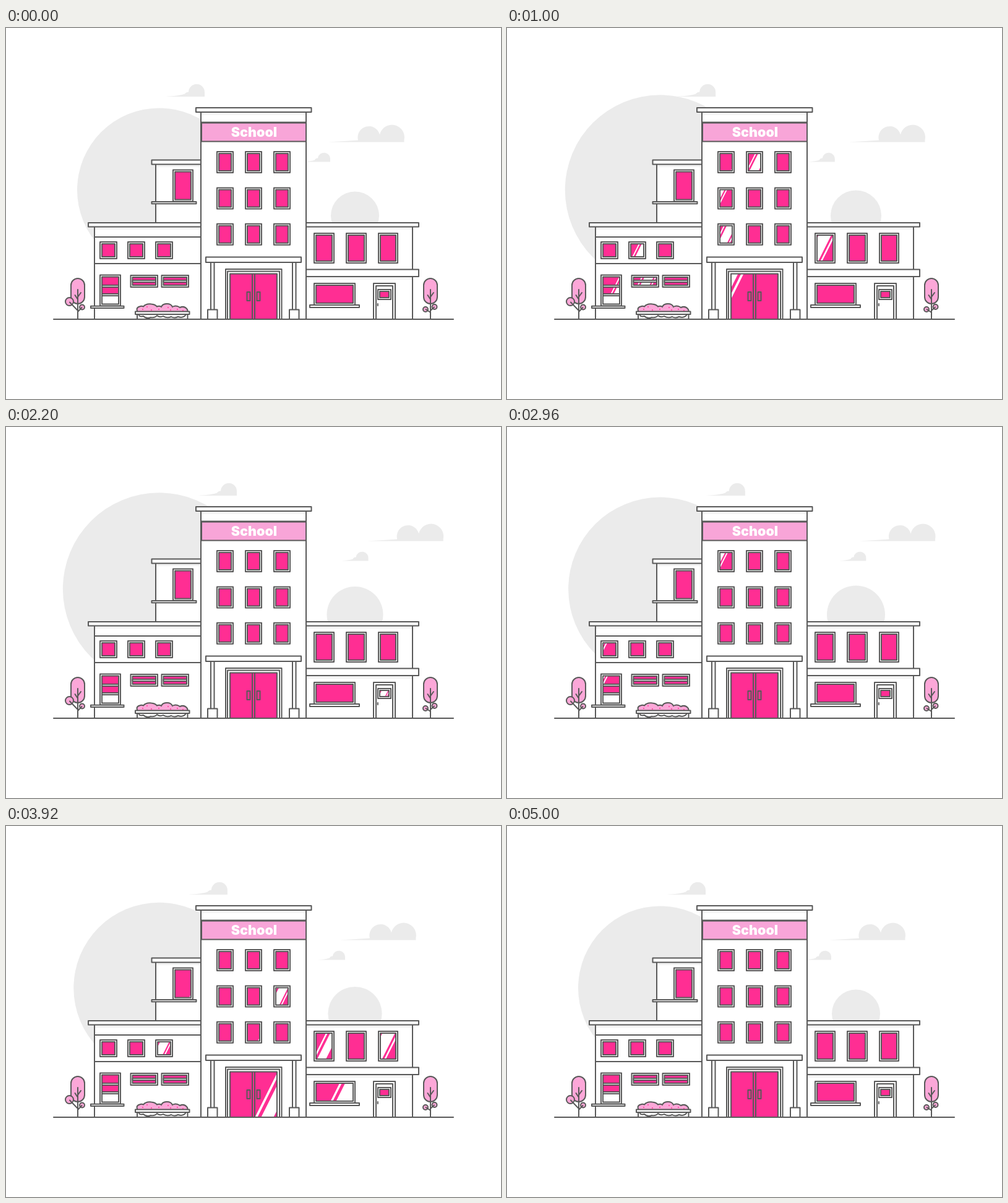
An HTML page that plays this animation: 800x600 px, repeating every 7000 ms.

```html
<!DOCTYPE html>
<html lang="en">
<head>
<meta charset="utf-8">
<title>School</title>
<style>
html, body { margin: 0; width: 100%; height: 100%; overflow: hidden; background: #fff; }
#stage { display: block; width: 800px; height: 600px; }
.ln { fill: none; stroke: #595959; stroke-width: 2; stroke-linecap: round; stroke-linejoin: round; }
.box { fill: #fff; stroke: #595959; stroke-width: 2; stroke-linejoin: round; }
.leaf { fill: #fca7d8; stroke: #595959; stroke-width: 2; }
.pane { fill: #ff2e93; }
.sky { fill: #ebebeb; }
.shade { fill: #f3f3f3; }
.sign { font: 900 21.5px Inter, "Open Sans", sans-serif; fill: #fff; text-anchor: middle; }
</style>
</head>
<body>
<svg id="stage" viewBox="0 0 800 600"></svg>
<script>
const NS = 'http://www.w3.org/2000/svg';
const LOOP = 7000, END = 5000, STEP = 40, SLANT = 0.5;
const stage = document.getElementById('stage');

function add(tag, attrs, parent = stage) {
  const el = document.createElementNS(NS, tag);
  for (const k in attrs) el.setAttribute(k, attrs[k]);
  parent.appendChild(el);
  return el;
}
const rect = (x, y, r, b, cls = 'box', rx = 0) =>
  add('rect', { x, y, width: r - x, height: b - y, rx, class: cls });
const circle = (cx, cy, r, cls) => add('circle', { cx, cy, r, class: cls });
const path = (d, cls = 'ln') => add('path', { d, class: cls });

// Sky: each part swells or drifts once and comes back
const bigSun = circle(247.5, 262, 132.5, 'sky');
const smallSun = circle(564, 303.5, 39, 'sky');
const clouds = [
  { el: path('M258 111 Q281 109.5 289 106.5 Q291 103.5 295 103.5 A13 13 0 0 1 321 104 V111 Z', 'sky'), from: 0, peak: 3040 },
  { el: path('M520 184.5 Q548 183 569 181.5 A15.5 15.5 0 0 1 604 172.5 A19.5 19.5 0 0 1 643.5 181 V184.5 Z', 'sky'), from: 0, peak: 2000 },
  { el: path('M480 216.5 Q494 215.5 499 213.5 Q500 210.5 504 210.5 A9.3 9.3 0 0 1 524 213 V216.5 Z', 'sky'), from: 680, peak: 2400 }
];

// Glints: bands measured back from the leading edge
const SINGLE = [[0, 2], [4.5, 19], [22, 24]];
const DOUBLE = [[0, 2], [4.5, 19], [27, 37], [40, 42]];
const glints = [];

// passes: [start, duration] pairs
function pane(x, y, r, b, scale, bands, passes) {
  const w = r - x, h = b - y;
  const view = add('svg', { x, y, width: w, height: h });
  add('rect', { width: w, height: h, class: 'pane' }, view);
  const g = add('g', {}, view);
  const skew = h * SLANT;
  for (const [a, z] of bands) {
    const p = -z * scale, q = -a * scale;
    add('path', { d: `M${p} 0H${q}L${q - skew} ${h}H${p - skew}Z`, fill: '#fff' }, g);
  }
  const span = w + skew + bands[bands.length - 1][1] * scale;
  glints.push({ g, span, passes });
}

function win(x, y, w, h, scale, bands, passes) {
  rect(x, y, x + w, y + h);
  pane(x + 3, y + 3, x + w - 3, y + h - 3, scale, bands, passes);
  rect(x + 3, y + 3, x + w - 3, y + h - 3, 'ln');
}
const pair = (a, b, d = 720) => [[a, d], [b, d]];

function leftWing() {
  rect(242, 217, 315, 316);
  rect(243, 221, 314, 225, 'shade');
  rect(235.5, 213.5, 315, 220.5);
  win(270, 229.5, 32, 51, 1.4, SINGLE, pair(1060, 3120, 900));
  rect(235.5, 281, 307.5, 284.3);

  rect(143, 318, 315, 471);
  rect(144, 322, 314, 326, 'shade');
  rect(133, 315, 315, 321.5);
  path('M143 338H315M143 381H315');
  [[260, 2800], [560, 3180], [1130, 3600]].forEach(([a, b], i) =>
    win(152 + 45 * i, 346, 27, 27, 1, SINGLE, pair(a, b)));

  rect(152, 399.5, 185, 449.5);
  pane(155, 402.5, 182, 430, 1, SINGLE, pair(500, 2800));
  rect(155, 402.5, 182, 446.5, 'ln');
  rect(155, 416, 182, 419);
  rect(155, 430, 182, 433);
  rect(137, 449.8, 190.5, 453);

  [[600, 3020], [1200, 3180]].forEach(([a, b], i) => {
    const x = 201.5 + 50 * i;
    win(x, 400, 43.5, 19, 1, SINGLE, pair(a, b, 760));
    rect(x + 3, 408, x + 40.5, 411);
  });
}

function planter() {
  path('M213 460 Q209 452 216 450.5 Q219 449 222 450.5 Q226 445.5 235 446.5 Q241 447 244 450.5 Q248 449 251 451 Q253 446 260 446 Q267 446 269 451 Q275 447.5 281 452 Q288 449 292 454 Q295 457 292 460 Z', 'leaf');
  for (const [x, y] of [[221, 455], [228, 451], [235, 456], [247, 455], [262, 452], [266, 456], [277, 455], [286, 457]])
    circle(x, y, 0.9, 'pane');
  path('M214 463 Q216 468 222 466 Q227 471 234 468 Q241 469 244 465 Q249 469 254 466 Q260 470 267 467 Q272 470 278 467 Q287 470 291 463', 'box');
  rect(209, 458.5, 296.5, 463);
  path('M212 463V471M293.5 463V471');
}

function rightWing() {
  rect(485, 318, 657, 471);
  rect(486, 322, 656, 326, 'shade');
  rect(485, 315, 667, 321.5);
  win(498, 332, 32, 48, 1.4, DOUBLE, [[480, 1500], [3150, 1200]]);
  win(550, 332, 32, 48, 1.4, SINGLE, [[960, 720], [3160, 800]]);
  win(602, 332, 31, 48, 1.4, SINGLE, [[1330, 760], [3620, 720]]);
  rect(486, 402, 656, 407, 'shade');
  rect(485, 390.5, 667, 402);
  win(498, 413, 66, 35, 1.8, SINGLE, pair(1090, 3290, 1000));
  rect(491, 448, 571, 452);
  rect(594, 413, 629, 471);
  rect(598, 417, 625, 471);
  win(601, 423, 21, 16, 0.7, SINGLE, pair(1920, 4120, 600));
  path('M600.8 446V449');
}

function tower() {
  rect(315, 132, 485, 471);
  rect(316, 137, 484, 140.5, 'shade');
  rect(307, 129, 493.5, 136);
  path('M315 152.5H485');
  rect(316, 153.5, 485, 183.5, 'box').style.fill = '#f8a5d8';
  add('text', { x: 401, y: 176, class: 'sign' }).textContent = 'School';

  const starts = [
    [[370, 2740], [590, 3210], [1220, 3040]],
    [[790, 3235], [1205, 3165], [1080, 3600]],
    [[630, 3180], [1146, 3300], [970, 3110]]
  ];
  starts.forEach((row, j) => row.forEach(([a, b], i) =>
    win(341 + 46 * i, 200 + 58.4 * j, 26, 34, 1, SINGLE, pair(a, b))));

  rect(355, 390, 445.5, 471);
  rect(358, 393.5, 442, 471);
  pane(362, 397.5, 438, 471, 2, DOUBLE, [[740, 1300], [2900, 1400]]);
  rect(362, 397.5, 438, 471, 'ln');
  path('M398 398V471M402 398V471');
  for (const x of [389.5, 405.5]) rect(x, 427, x + 5, 441, 'ln');

  for (const x of [331, 463]) {
    rect(x, 378, x + 5.5, 456);
    rect(x - 5, 455.5, x + 10.5, 471);
  }
  rect(323, 370.5, 477, 379);
}

function trees() {
  rect(105, 405, 127, 446, 'leaf', 11);
  circle(102.5, 442.5, 6.5, 'leaf');
  circle(123, 451.5, 4, 'leaf');
  path('M116 423V471M116 435L121 428M116 439L111.5 432M116 457L103 443.5M116 459L122.5 452');
  rect(675, 405, 697, 446, 'leaf', 11);
  circle(678, 455, 4, 'leaf');
  circle(692.5, 451, 4, 'leaf');
  path('M686 423V471M686 435L691 428M686 439L681.5 432M686 460L678.5 455M686 457L692 451.5');
}

leftWing();
planter();
rightWing();
tower();
trees();
path('M77 471H723');

function ease(t, from, to) {
  const p = Math.min(1, Math.max(0, (t - from) / (to - from)));
  return p * p * (3 - 2 * p);
}
const swing = (t, peak, from = 0) => ease(t, from, peak) - ease(t, peak, END);

function draw(t) {
  bigSun.setAttribute('r', 132.5 * (1 + 0.2 * swing(t, 1400)));
  smallSun.setAttribute('r', 39 + 8 * swing(t, 3040));
  for (const c of clouds)
    c.el.setAttribute('transform', `translate(${64 * swing(t, c.peak, c.from)} 0)`);
  for (const { g, span, passes } of glints) {
    const [start, dur] = t < passes[1][0] ? passes[0] : passes[1];
    g.setAttribute('transform', `translate(${span * ease(t, start, start + dur)} 0)`);
  }
}

const begin = performance.now();
function tick() {
  const t = (performance.now() - begin) % LOOP;
  draw(Math.min(END, Math.floor(t / STEP) * STEP));
  requestAnimationFrame(tick);
}
draw(0);
requestAnimationFrame(tick);
</script>
</body>
</html>
```
